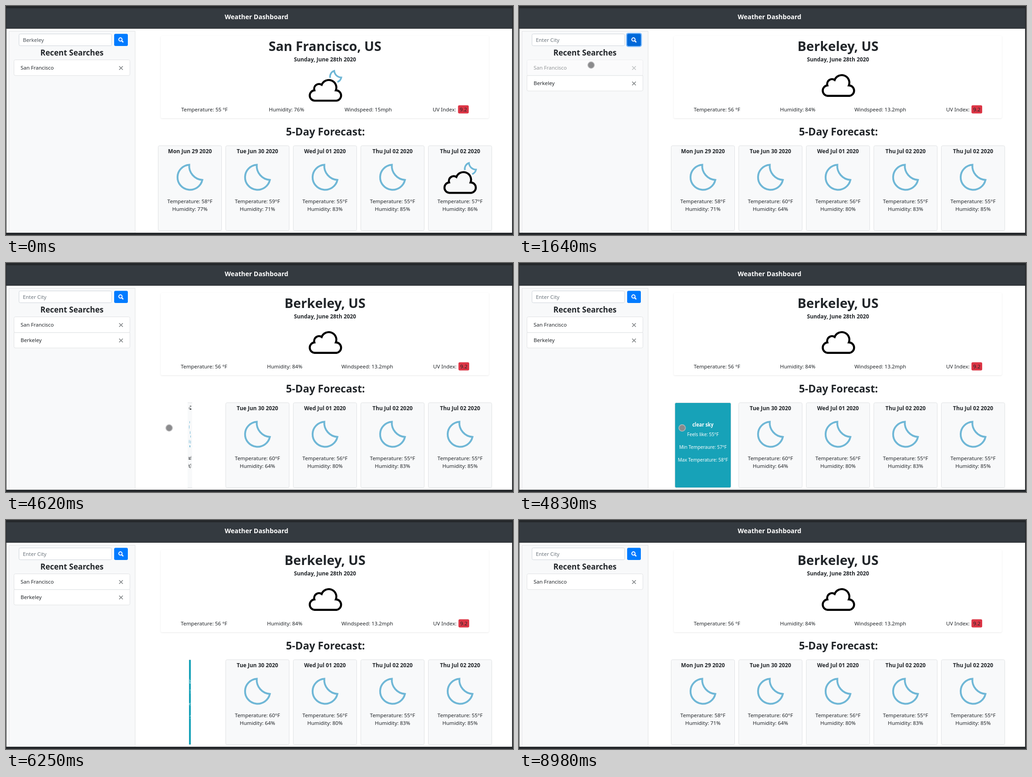
Recreate the animation shown at these times as an HTML page. Size 1111 by 504 pixels, loop 9460 ms.

```html
<!DOCTYPE html>
<html lang="en">
<head>
<meta charset="utf-8">
<title>Weather Dashboard</title>
<style>
  html, body { margin: 0; width: 100%; height: 100%; overflow: hidden; background: #fff; }
  svg { position: absolute; left: 0; top: 0; display: block; }
  text { font: 11.4px "Noto Sans", "Open Sans", sans-serif; fill: #212529; }
  .b { font-weight: 700; font-size: 11.9px; }
  .m { text-anchor: middle; }
  .line { fill: none; stroke: #dfe1e3; }
  .moon { fill: none; stroke: #6fb7d6; }
  .cloud { fill: none; stroke: #000; stroke-width: 4.4; }
  .card { top: 307px; }
  .back text { fill: #fff; }

  .step, .cur-a, .cur-b, .day-a, .day-b { animation: 9.46s step-end infinite; }
  .cur-a { animation-name: curA; }
  .cur-b { animation-name: curB; }
  .day-a { animation-name: dayA; }
  .day-b { animation-name: dayB; }
  .typed { animation-name: typed; }
  .hint { animation-name: hint; }
  .item1 { animation-name: item1; }
  .item2 { animation-name: item2; }
  .tap { animation-name: tap; }
  .btn { animation: btn 9.46s ease-in-out infinite; }
  .ring { animation: ring 9.46s ease-in-out infinite; }
  .front, .back { backface-visibility: hidden; animation: front 9.46s infinite; }
  .back { animation-name: back; }

  @keyframes curA { 0%, 19.027% { opacity: 1 } 4.228%, 29.07%, 100% { opacity: 0 } }
  @keyframes curB { 0%, 19.027% { opacity: 0 } 4.228%, 29.07%, 100% { opacity: 1 } }
  @keyframes dayA { 0%, 20.296% { opacity: 1 } 5.603%, 30.761%, 100% { opacity: 0 } }
  @keyframes dayB { 0%, 20.296% { opacity: 0 } 5.603%, 30.761%, 100% { opacity: 1 } }
  @keyframes typed { 0% { opacity: 1 } 2.431%, 100% { opacity: 0 } }
  @keyframes hint { 0% { opacity: 0 } 2.431%, 100% { opacity: 1 } }
  @keyframes item1 { 0%, 18.182%, 100% { opacity: 1 } 17.336% { opacity: .47 } }
  @keyframes item2 {
    0%, 77.696%, 100% { opacity: 0 }
    2.431%, 28.436% { opacity: 1 }
    27.696%, 77.378% { opacity: .47 }
  }
  @keyframes btn {
    0%, 1.374%, 18.922%, 100% { fill: #007bff }
    2.96%, 17.336% { fill: #0069d9 }
  }
  @keyframes ring {
    0%, 1.374%, 18.922%, 100% { opacity: 0 }
    2.96%, 17.336% { opacity: .5 }
  }
  @keyframes front {
    0%, 46.459% { transform: rotateY(0deg); animation-timing-function: ease }
    54.915%, 63.636% { transform: rotateY(180deg); animation-timing-function: ease }
    72.093%, 100% { transform: rotateY(0deg) }
  }
  @keyframes back {
    0%, 46.459% { transform: rotateY(180deg); animation-timing-function: ease }
    54.915%, 63.636% { transform: rotateY(360deg); animation-timing-function: ease }
    72.093%, 100% { transform: rotateY(180deg) }
  }
  @keyframes tap {
    0%, 6.66%, 22.516%, 35.941%, 51.374%, 59.408%, 81.607%, 100% { opacity: 0 }
    1.374% { opacity: 1; transform: translate(252px, 75px) }
    17.336% { opacity: 1; transform: translate(158px, 130px) }
    27.696% { opacity: 1; transform: translate(158px, 171px) }
    46.195%, 56.131% { opacity: 1; transform: translate(357.5px, 363px) }
    77.378% { opacity: 1; transform: translate(251.5px, 170.5px) }
  }
</style>
</head>
<body>
<svg width="1111" height="504">
  <defs>
    <path id="cloud" class="cloud" d="M12.5 46.7A11.5 11.5 0 0 1 12 23.8A10.6 10.6 0 0 1 28 11.8A16.5 16.5 0 0 1 59 23.8A11.5 11.5 0 0 1 60.5 46.7Z"/>
    <path id="moon" class="moon" stroke-width="4" d="M68.5 42.5A27.5 27.5 0 1 0 97.2 75.8A31 31 0 0 1 68.5 42.5Z"/>
    <g id="night">
      <use href="#cloud" y="22"/>
      <path class="moon" stroke-width="3.6" d="M46.5 18.5A13.5 13.5 0 0 1 55.5 3A15.5 15.5 0 0 0 71 17.5A13.5 13.5 0 0 1 62.5 27.5"/>
    </g>
    <path id="cross" d="M-4-4L4 4M4-4L-4 4" stroke="#7f8385" stroke-width="1.7"/>
  </defs>

  <!-- window and header -->
  <rect width="1111" height="504" fill="#25282b"/>
  <rect x="1" y="5" width="1108" height="44" fill="#343a40"/>
  <rect x="1" y="50" width="1108" height="449" fill="#fff"/>
  <text class="b m" x="549" y="29" style="font-size:14px;fill:#fff">Weather Dashboard</text>

  <!-- sidebar -->
  <path d="M6.5 499V55.5H283V499" fill="#f8f9fa" stroke="#dfe1e3"/>
  <rect x="28.5" y="61.5" width="203" height="26" rx="3" fill="#fff" stroke="#ced4da"/>
  <text class="step typed" x="37" y="79" style="fill:#495057">Berkeley</text>
  <text class="step hint" x="37" y="79" style="fill:#6c757d">Enter City</text>
  <rect class="ring" x="234.7" y="58.9" width="34.6" height="31.4" rx="5" fill="#007bff"/>
  <rect class="btn" x="237" y="61.2" width="30" height="26.8" rx="3"/>
  <g fill="none" stroke="#fff" stroke-width="2">
    <circle cx="250.8" cy="73.7" r="3.6"/>
    <path d="M253.3 76.2L257 79.9" stroke-width="2.4"/>
  </g>
  <text class="b m" x="144.5" y="109" style="font-size:17px">Recent Searches</text>
  <g class="step item2">
    <path d="M17.5 153H271.5V184a3 3 0 0 1-3 3H20.5a3 3 0 0 1-3-3Z" fill="#fff" stroke="#dfe1e3"/>
    <text x="32" y="174">Berkeley</text>
    <use href="#cross" x="252" y="170.5"/>
  </g>
  <g class="step item1">
    <rect x="17.5" y="118.5" width="254" height="34.5" rx="3" fill="#fff" stroke="#dfe1e3"/>
    <text x="32" y="140">San Francisco</text>
    <use href="#cross" x="252" y="136.5"/>
  </g>

  <!-- current weather -->
  <rect x="339" y="66" width="719" height="181" rx="3" fill="#fff" style="filter:drop-shadow(0 1.4px 1.4px rgba(0,0,0,.09))"/>
  <text class="b m" x="699" y="121.5">Sunday, June 28th 2020</text>
  <g id="now"></g>
  <text class="b m" x="700" y="285" style="font-size:22.8px">5-Day Forecast:</text>
</svg>

<div id="days"></div>

<svg width="1111" height="504">
  <circle class="step tap" r="7.2" fill="#8b8b8d" stroke="#bcbcbe" stroke-width="1.5"/>
</svg>

<script>
  const label = (x, y, s, cls = 'm') => `<text class="${cls}" x="${x}" y="${y}">${s}</text>`;

  const current = (cls, city, icon, iconY, xs, temp, hum, wind) => `
    <g class="${cls}">
      <text class="b m" x="699" y="98.5" style="font-size:28.7px">${city}, US</text>
      <use href="#${icon}" x="663.8" y="${iconY}"/>
      ${[`Temperature: ${temp} °F`, `Humidity: ${hum}%`, `Windspeed: ${wind}mph`, 'UV Index:']
        .map((s, i) => label(xs[i], 231.5, s, '')).join('')}
      <rect x="${xs[3] + 55.5}" y="218.5" width="23.5" height="18" rx="3" fill="#dc3545"/>
      ${label(xs[3] + 67.3, 231.5, '9.2')}
    </g>`;

  document.getElementById('now').innerHTML =
    current('cur-a', 'San Francisco', 'night', 139.7, [384, 576, 742, 935], 55, 76, 15) +
    current('cur-b', 'Berkeley', 'cloud', 151, [383, 572, 735, 936], 56, 84, 13.2);

  const card = (i, cls, body) =>
    `<svg class="card ${cls}" width="140" height="188" style="left:${333 + 148 * i}px">${body}</svg>`;
  const frame = '<rect x=".5" y=".5" width="139" height="187" rx="3" fill="#f8f9fa" stroke="#dfe1e3"/>';
  const reading = (cls, icon, [temp, hum]) => `
    <g class="${cls}">
      <use href="#${icon}" ${icon === 'night' ? 'x="34" y="35.5"' : ''}/>
      ${label(70, 126.5, `Temperature: ${temp}°F`)}
      ${label(70, 143.5, `Humidity: ${hum}%`)}
    </g>`;

  const dates = ['Mon Jun 29', 'Tue Jun 30', 'Wed Jul 01', 'Thu Jul 02', 'Thu Jul 02'];
  const first = [[58, 77], [59, 71], [55, 83], [55, 85], [57, 86]];
  const second = [[58, 71], [60, 64], [56, 80], [55, 83], [55, 85]];

  const back = card(0, 'back',
    '<rect x=".5" y=".5" width="139" height="187" rx="3" fill="#17a2b8" stroke="#dfe1e3"/>' +
    label(70, 53.5, 'clear sky', 'b m') +
    label(70, 74.5, 'Feels like: 55°F') +
    label(70, 102.5, 'Min Temperaure: 57°F') +
    label(70, 130.5, 'Max Temperature: 58°F'));

  document.getElementById('days').innerHTML = back + dates.map((date, i) =>
    card(i, i ? '' : 'front',
      frame + label(70, 16.5, date + ' 2020', 'b m') +
      reading('day-a', i === 4 ? 'night' : 'moon', first[i]) +
      reading('day-b', 'moon', second[i]))).join('');
</script>
</body>
</html>
```
